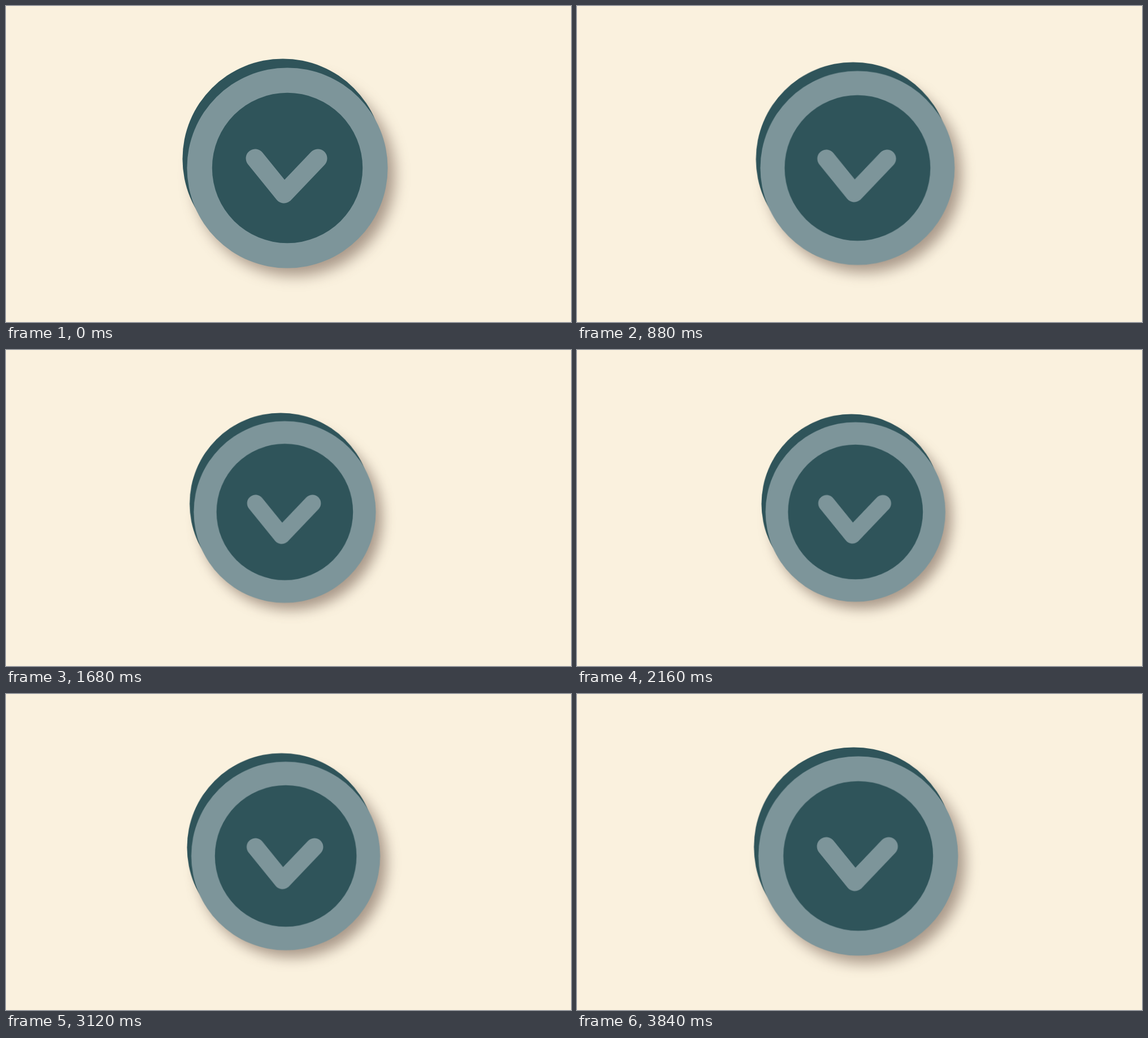
Write an HTML page that moves like this. It is 1000x560 px and loops after 3.92 s.

```html
<!DOCTYPE html>
<html lang="en">
<head>
<meta charset="utf-8">
<title>Pulsing button</title>
<style>
  html, body {
    margin: 0;
    width: 100%;
    height: 100%;
    overflow: hidden;
    background: #faf1de;
  }
  svg {
    display: block;
    width: 100%;
    height: 100%;
  }
  .dark { fill: #2f545a; }
  .light { fill: #7d959a; }
  .shadow { fill: #4b3227; fill-opacity: .47; }
  .chevron {
    fill: none;
    stroke: #7d959a;
    stroke-width: 33;
    stroke-linecap: round;
    stroke-linejoin: round;
  }
  .button {
    transform-origin: 448px 287px;
    animation: pulse 3920ms infinite;
  }
  /* shrink, then grow back; both halves start slowly */
  @keyframes pulse {
    0% { transform: scale(1); animation-timing-function: ease-in; }
    46.94% { transform: scale(.892); animation-timing-function: ease-in; }
    99.49%, 100% { transform: scale(1); }
  }
</style>
</head>
<body>
<svg viewBox="0 0 1000 560">
  <defs>
    <filter id="soft" x="-30%" y="-30%" width="160%" height="160%" color-interpolation-filters="sRGB">
      <feGaussianBlur stdDeviation="13"/>
    </filter>
  </defs>
  <g class="button">
    <circle class="shadow" cx="510" cy="300" r="177.6" filter="url(#soft)"/>
    <circle class="dark" cx="490" cy="271" r="177.6"/>
    <circle class="light" cx="498" cy="287" r="177.6"/>
    <circle class="dark" cx="498" cy="287" r="133.2"/>
    <path class="chevron" d="M441 270 L492 333 L552 270"/>
  </g>
</svg>
</body>
</html>
```
